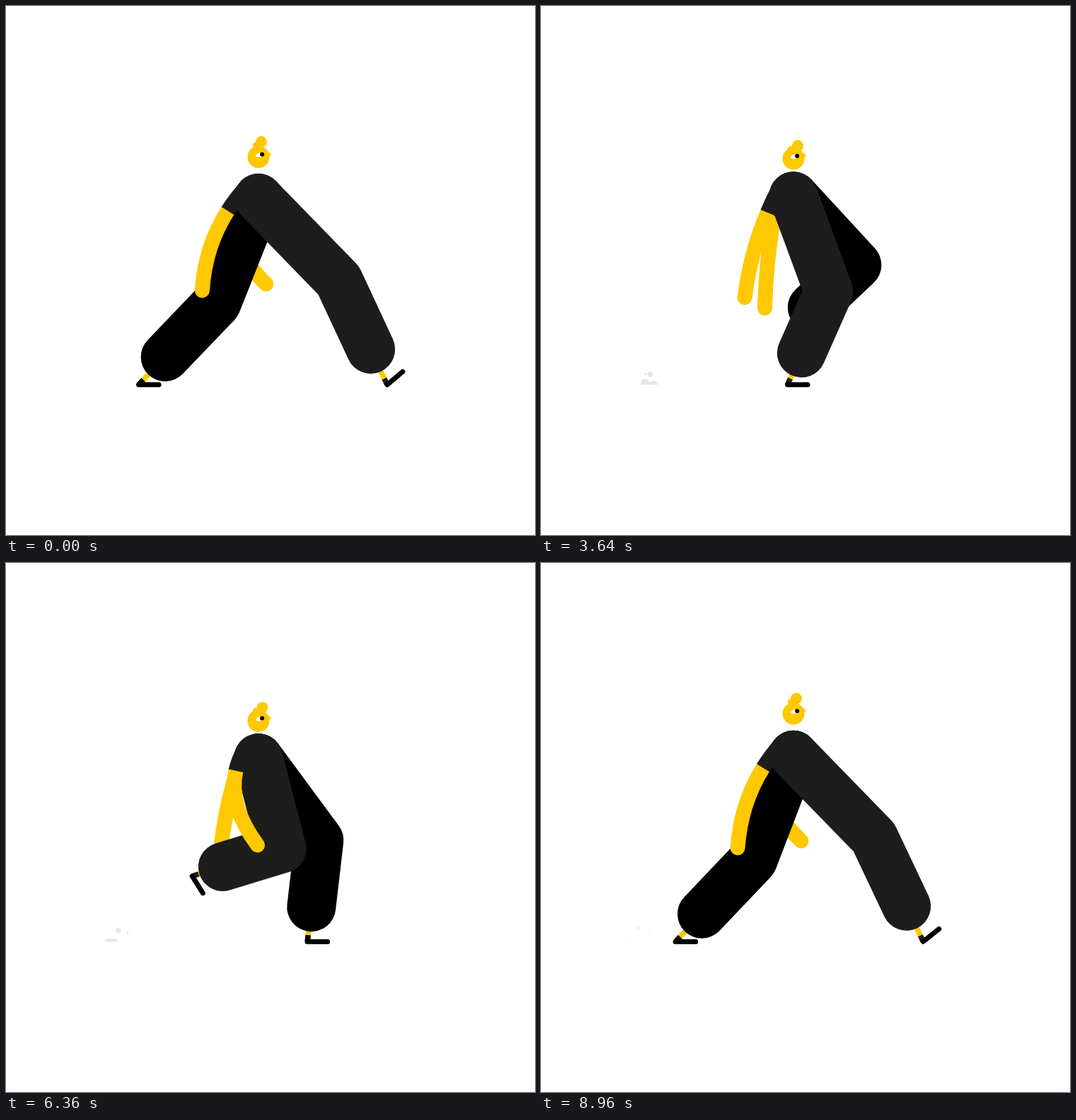
Recreate the animation shown at these times as an HTML page with a canvas. Size 748x748 px, loop 9000 ms.

```html
<!DOCTYPE html>
<html lang="en">
<head>
<meta charset="utf-8">
<title>Walk cycle</title>
<style>
html, body { margin: 0; width: 100%; height: 100%; overflow: hidden; background: #fff; }
canvas { display: block; width: 100vw; height: 100vh; }
</style>
</head>
<body>
<canvas width="748" height="748"></canvas>
<script>
const ctx = document.querySelector('canvas').getContext('2d');
const YELLOW = '#ffc800', DARK = '#1d1d1d', BLACK = '#000', DUST = '#e6e6e6';
const LOOP = 9000, STEP = 40, CYCLE = 1120.5, HALF = CYCLE / 2;
const STANCE = 530; // time a foot stays on the ground
const LAG = 34;     // the far leg trails half a cycle by this much
const GROUND = 535.5, HIP_X = 357, FOOT = 28.5;

const { sin, cos, exp, abs, min, max, hypot, PI } = Math;
const mod = (a, n) => ((a % n) + n) % n;
const mix = (a, b, k) => a.map((v, i) => v + (b[i] - v) * k);

function line(points, width, color, cap = 'round') {
  ctx.beginPath();
  points.forEach(p => ctx.lineTo(...p));
  stroke(width, color, cap);
}

function curve(a, c, b, width, color, cap) {
  ctx.beginPath();
  ctx.moveTo(...a);
  ctx.quadraticCurveTo(...c, ...b);
  stroke(width, color, cap);
}

function stroke(width, color, cap) {
  ctx.lineWidth = width;
  ctx.strokeStyle = color;
  ctx.lineCap = cap;
  ctx.lineJoin = 'round';
  ctx.stroke();
}

function disc(x, y, r, color) {
  ctx.beginPath();
  ctx.arc(x, y, r, 0, 7);
  ctx.fillStyle = color;
  ctx.fill();
}

// Heel position and foot angle; the time starts at heel strike.
function footPose(time) {
  const t = mod(time, CYCLE);
  if (t < STANCE) {
    return [539 - 0.702 * t + 6.5e-5 * t * t, GROUND, -40 * max(0, 1 - t / 6)];
  }
  const u = (t - STANCE) / (CYCLE - STANCE);
  const swing = 1 / (1 + exp(-13.4 * (u - 0.475)));
  const slide = 7 * (1 - 2 * u) ** 9; // follows the ground near both contacts
  const lift = 94 * exp(-((u - 0.356) ** 2) / 0.065) * min(1, u * 12);
  const angle = min(700 * u, 85 - 125 * u ** 1.6);
  return [178 + 369 * swing + slide, GROUND - lift, angle];
}

function leg(t, hipY, color) {
  const [x, y, deg] = footPose(t);
  const hip = [HIP_X, hipY], heel = [x, y];
  const dx = x - HIP_X, dy = y - hipY, d = hypot(dx, dy);
  const bend = (375 - d) / 2;
  const knee = [HIP_X + dx / 2 + dy / d * bend, hipY + dy / 2 - dx / d * bend];
  const cuff = mix(knee, heel, 0.66);
  const sock = mix(heel, knee, 9.5 / hypot(x - knee[0], y - knee[1]));
  const a = deg * PI / 180;
  line([cuff, heel], 7.5, YELLOW, 'butt');
  line([sock, heel], 7.5, color, 'butt');
  line([heel, [x + FOOT * cos(a), y + FOOT * sin(a)]], 7, BLACK);
  line([hip, knee, cuff], 69, color);
}

// A hose from shoulder to hand; s swings from -1 (back) to 1 (front).
function arm(t, center, reach, hipY) {
  const s = -cos(t / CYCLE * 2 * PI);
  const hand = [center + reach * s, 428 - 35 * abs(s) ** 1.5];
  const bend = [320 + 13 * s - 40 * s * s, 339 + 5 * s - 24 * s * s];
  const shoulder = [338, hipY - 14];
  const k = 0.25;
  const upper = mix(shoulder, bend, k), lower = mix(bend, hand, k);
  const cuff = mix(upper, lower, k);
  curve(cuff, lower, hand, 21, YELLOW, 'round');
  curve(shoulder, upper, cuff, 21, DARK, 'butt');
}

function head(y, bunX, bunY) {
  ctx.save();
  ctx.translate(HIP_X, y);
  disc(0, 0, 15.5, YELLOW);
  disc(bunX, bunY, 8, YELLOW);
  disc(-3.5, bunY + 5, 4.7, YELLOW);
  ctx.beginPath();
  ctx.moveTo(11, -11);
  ctx.lineTo(18, -4);
  ctx.lineTo(13, 1);
  ctx.fill();
  ctx.beginPath();
  ctx.ellipse(1.8, -2.8, 5.7, 3, -0.25, 0, 7);
  ctx.fillStyle = '#fff';
  ctx.fill();
  disc(5.2, -3.8, 3, BLACK);
  ctx.restore();
}

// Two mounds and two specks (x, y, radius) kicked up by each foot in turn.
const PUFFS = [
  [[147, 534, 6.5], [158.5, 536.5, 6.5], [154.5, 520.5, 3.7], [148, 520.5, 1.6]],
  [[138, 536.5, 6.3], [146, 536.5, 6.3], [154, 515.5, 3.7], [170, 519, 1.6]]
];

function dust(t) {
  const life = 620, spread = 270;
  ctx.save();
  ctx.beginPath();
  ctx.rect(0, 0, 748, GROUND);
  ctx.clip();
  for (let n = 0, age; (age = t - 30 - n * HALF) >= 0; n++) {
    if (age > life) continue;
    ctx.globalAlpha = min(1, 0.2 + age / 60, (life - age) / 250);
    const k = sin(min(1, age / spread) * PI / 2);
    const late = max(0, age - spread);
    for (const puff of PUFFS[n % 2]) {
      const [x, y] = mix([181, 540], puff, k);
      const sink = puff[2] > 5 ? 0.018 * late : 0;
      disc(x - 0.065 * late, y + sink, puff[2], DUST);
    }
  }
  ctx.restore();
}

function draw(t) {
  const a = t / HALF * 2 * PI;
  const wave = (mean, c1, s1, c2, s2) =>
    mean + c1 * cos(a) + s1 * sin(a) + c2 * cos(2 * a) + s2 * sin(2 * a);
  const hipY = wave(267.5, 1.5, 10.1, 2.5, -1.7);
  const headY = wave(212, -1, 13, 2.5, -1);

  ctx.fillStyle = '#fff';
  ctx.fillRect(0, 0, 748, 748);
  dust(t);
  arm(t + 15 - HALF, 320, 48, hipY);
  leg(t - HALF - LAG, hipY, BLACK);
  leg(t, hipY, DARK);
  head(headY, 5 - cos(a), -19.8 - 1.6 * cos(a));
  arm(t - 110, 315, 46, hipY);
}

function tick() {
  draw(Math.floor(performance.now() % LOOP / STEP) * STEP);
  requestAnimationFrame(tick);
}
tick();
</script>
</body>
</html>
```
